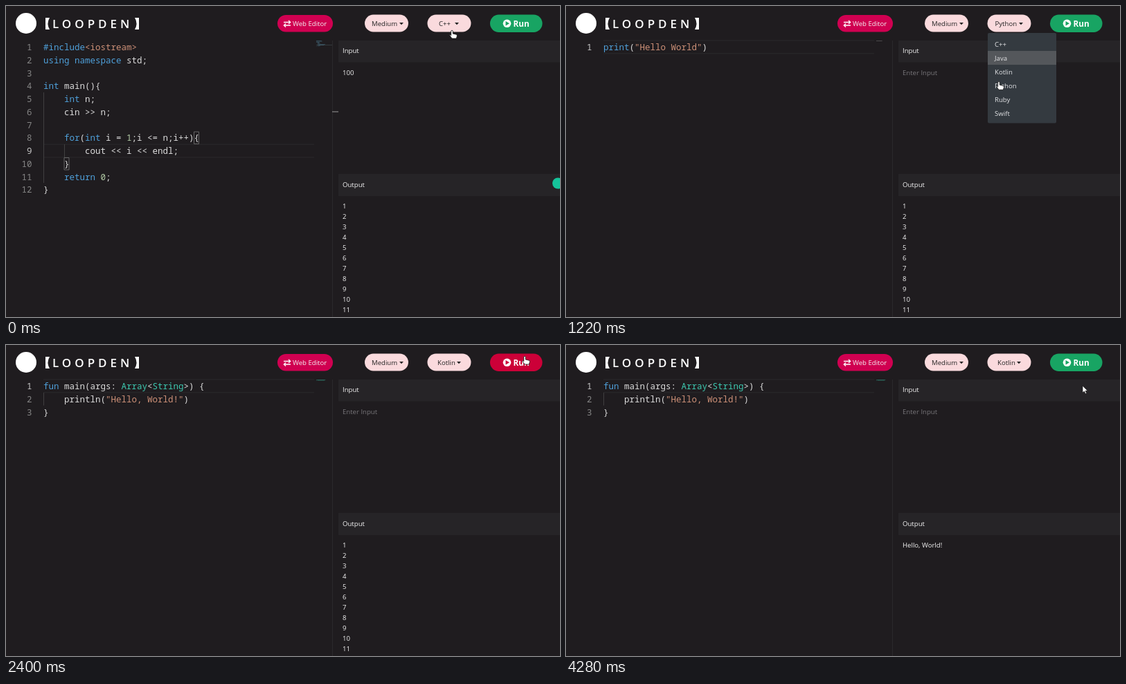
An HTML page that plays this animation: 800x450 px, repeating every 4.3 s.

```html
<!DOCTYPE html>
<html lang="en">
<head>
<meta charset="utf-8">
<title>Code editor</title>
<style>
html, body { margin: 0; width: 100%; height: 100%; overflow: hidden; background: #1f1c1f; }
svg { display: block; width: 800px; height: 450px; }
text { font: 9.6px "Open Sans", "Noto Sans", sans-serif; fill: #f4f4f4; white-space: pre; }
.code text { font: 12.5px "Noto Sans Mono", "DejaVu Sans Mono", monospace; fill: #dcdcdc; }
.code .num { text-anchor: end; fill: #858585; }
.code .now { fill: #c6c6c6; }
.pill { fill: #fadadd; }
.dark { fill: #222; }
.brand { font-size: 17px; font-weight: 600; letter-spacing: 5px; fill: #fff; }
.run { font-size: 11.7px; font-weight: 700; fill: #fff; }
.menu text { fill: #e2e3e5; }
.line { fill: none; stroke: #2b292c; }
.guide { stroke: #404040; }
.match { fill: none; stroke: #777; stroke-width: .8; }
</style>
</head>
<body>
<svg viewBox="0 0 800 450">
  <circle cx="29" cy="25" r="15" fill="#fff"/>
  <path d="M57 17h6q-5 8.5 0 17h-6zM192 17h-6q5 8.5 0 17h6z" fill="#fff"/>
  <text class="brand" x="67" y="32">LOOPDEN</text>

  <rect x="392" y="13" width="80" height="24.5" rx="12.2" fill="#d00051"/>
  <path d="M401 23.5h9M408 21l2.7 2.5-2.7 2.5M411 28h-9M404 25.500l-2.700 2.500 2.700 2.500" fill="none" stroke="#fff" stroke-width="1.3"/>
  <text x="414" y="29">Web Editor</text>
  <rect class="pill" x="518" y="12.500" width="63" height="25" rx="12.500"/>
  <text class="dark" x="528" y="29">Medium</text>
  <path class="dark" d="M568 24h6l-3 3.200z"/>
  <rect class="pill" x="608.500" y="12.500" width="63" height="25" rx="12.500"/>
  <text class="dark" id="lang" y="29"></text>
  <path class="dark" id="caret" d="M0 24h6l-3 3.200z"/>

  <rect id="runBox" x="699" y="12.500" width="75.500" height="25.500" rx="12.700"/>
  <g id="play"><circle r="5.800" fill="#fff"/><path id="triangle" d="M-2 -3.200L3.500 0L-2 3.200z"/></g>
  <text class="run" id="runText" x="732.500" y="29.800">Run</text>

  <rect x="480" y="50" width="320" height="31.500" fill="#262427"/>
  <text x="486" y="68">Input</text>
  <text id="input" x="486" y="99.600"></text>
  <rect x="480" y="243" width="320" height="32" fill="#262427"/>
  <text x="486" y="261.500">Output</text>
  <g id="counts"></g>
  <text id="hello" x="486" y="293">Hello, World!</text>

  <g id="editors"></g>
  <text id="loading" x="219" y="279.500" style="fill:#20282b">Loading...</text>
  <rect id="bar" x="471" y="50" width="9" height="400" fill="#454547"/>
  <circle id="badge" cx="797" cy="256.500" r="8" fill="#15c39a"/>

  <g id="menu" class="menu">
    <rect x="609" y="39" width="99" height="130.500" rx="2" fill="#343a40"/>
    <rect id="mark" x="609" width="99" height="20" fill="#54575b"/>
  </g>

  <g id="cursor">
    <path id="hand" d="M-1.300 1Q0-.800 1.300 1V5l5 1.200q1.300.400 1.100 2L6.400 12H0L-3.300 7.500q.300-1.500 2 0z" fill="#fff" stroke="#111" stroke-width=".8"/>
    <path id="arrow" d="M0 0v10l2.400-2.100 1.700 3.600 1.600-.800-1.700-3.400h3.200z" fill="#fff" stroke="#111" stroke-width=".6"/>
    <path id="beam" d="M-2.500-5.500h2l.5.500.5-.500h2M0-5V5M-2.500 5.500h2l.5-.500.5.500h2" fill="none" stroke="#000"/>
  </g>
</svg>
<script>
const $ = id => document.getElementById(id);
const show = (id, on) => $(id).style.display = on ? "" : "none";
const esc = s => s.replace(/&/g, "&amp;").replace(/</g, "&lt;");
const within = (v, a, b) => v >= a && v < b;
const clamp = v => Math.max(0, Math.min(1, v));

const LOOP = 4300, ROW = 18.77, CHAR = 7.5;
const TOKEN = /("[^"]*"|<iostream>|#include|\b(?:using|namespace|int|for|return|fun)\b|\bprint(?=\()|\b\d\b|\bArray\b|\bString\b)/;

function tint(token) {
  if (/^["<]/.test(token)) return "#ce9178";
  if (/^\d/.test(token)) return "#b5cea8";
  if (/^[AS]/.test(token)) return "#3dc9b0";
  return "#4fa0da";
}

const paint = line => line.split(TOKEN).map((s, i) =>
  i % 2 ? `<tspan fill="${tint(s)}" style="fill:${tint(s)}">${esc(s)}</tspan>` : esc(s)).join("");

function editor(id, source, current, mapTint, extra) {
  const top = 50 + (current - 1) * ROW;
  let out = `<path class="line" d="M54 ${top}H445M54 ${top + ROW}H445M471.500 50V450"/>${extra}`;
  source.split("\n").forEach((line, i) => {
    const y = 64 + i * ROW, indent = line.search(/\S|$/);
    out += `<text class="num${i + 1 === current ? " now" : ""}" x="37.500" y="${y}">${i + 1}</text>
      <text x="54" y="${y}">${paint(line)}</text>
      <rect x="${448 + indent * .45}" y="${50 + i * .75}" width="${(line.length - indent) * .43}" height=".6" fill="${mapTint}" opacity=".7"/>`;
  });
  return `<g id="${id}" class="code">${out}</g>`;
}

const cpp = `#include<iostream>
using namespace std;

int main(){
    int n;
    cin >> n;

    for(int i = 1;i <= n;i++){
        cout << i << endl;
    }
    return 0;
}`;
const kotlin = `fun main(args: Array<String>) {
    println("Hello, World!")
}`;

$("editors").innerHTML =
  editor("cpp", cpp, 9, "#4d7f96",
    `<path class="guide" d="M54.500 125V256M84.500 200V219"/>
     <path class="match" d="M271.500 182h7v17.500h-7zM84 219.500h7v17.500h-7z"/>
     <path d="M471 153h9" stroke="#9a9a9a"/><path d="M448 56.500h23" stroke="#333a3d"/>`) +
  editor("python", 'print("Hello World")', 1, "#8a8a8a", "") +
  editor("kotlin", kotlin, 1, "#35a58f", `<path class="guide" d="M54.500 69V87.500"/>`);

for (let n = 1; n <= 11; n++)
  $("counts").innerHTML += `<text x="486" y="${278 + n * 15}">${n}</text>`;
["C++", "Java", "Kotlin", "Python", "Ruby", "Swift"].forEach((name, i) =>
  $("menu").innerHTML += `<text x="619" y="${58.700 + i * 20}">${name}</text>`);

// Pointer path: time, x, y
const path = [
  [0, 644, 35], [80, 644, 35], [440, 640, 112], [520, 642, 112], [640, 648, 127],
  [760, 648, 127], [980, 632, 32], [1080, 632, 34], [1160, 628, 75], [1220, 625, 109],
  [1300, 626, 128], [1460, 630, 118], [1700, 634, 102], [1780, 634, 100], [1860, 640, 98],
  [2120, 745, 30], [2400, 749, 16], [2640, 749, 20], [2720, 735, 32], [3160, 476, 250],
  [3260, 409, 345], [3360, 409, 345], [3460, 475, 300], [3780, 690, 172], [4000, 735, 88],
  [4200, 746, 59], [LOOP, 746, 59]
];

function pointer(t) {
  const i = Math.max(1, path.findIndex(p => p[0] > t));
  const [t0, x0, y0] = path[i - 1], [t1, x1, y1] = path[i];
  const k = clamp((t - t0) / (t1 - t0));
  return [x0 + (x1 - x0) * k, y0 + (y1 - y0) * k];
}

const langs = { "C++": [625, 648], Python: [619.500, 654], Kotlin: [623, 651] };

function draw() {
  const t = performance.now() % LOOP;

  const lang = t < 500 ? "C++" : t < 1800 ? "Python" : "Kotlin";
  $("lang").textContent = lang;
  $("lang").setAttribute("x", langs[lang][0]);
  $("caret").setAttribute("transform", `translate(${langs[lang][1]})`);

  show("cpp", t < 540);
  show("python", within(t, 900, 1840));
  show("kotlin", t >= 2060);
  show("loading", within(t, 560, 900) || within(t, 1860, 2060));
  show("badge", t < 200);
  $("input").textContent = t < 500 ? "100" : "Enter Input";
  $("input").style.fill = t < 500 ? "" : "#78767a";

  const busy = within(t, 2520, 3760);
  show("counts", t < 2560);
  show("hello", t >= 3760);
  show("runText", !busy);
  const spin = busy ? (t - 2520) / 1480 * 360 : 0;
  $("play").setAttribute("transform", `translate(${busy ? 737 : 723.500} 25.300) rotate(${spin})`);

  const hot = clamp((t - 2080) / 80) - clamp((t - 2700) / 120);
  const mix = (a, b) => Math.round(a + (b - a) * hot);
  const runTint = `rgb(${mix(24, 204)},${mix(164, 0)},${mix(99, 56)})`;
  $("runBox").style.fill = $("triangle").style.fill = runTint;
  $("bar").style.opacity = clamp((t - 3120) / 80) - clamp((t - 3500) / 120);

  const open = within(t, 100, 500) || within(t, 1060, 1800);
  const row = Math.floor((pointer(t - 60)[1] - 45) / 20);
  show("menu", open);
  show("mark", within(row, 0, 6));
  $("mark").setAttribute("y", 45 + row * 20);

  const [x, y] = pointer(t);
  const onButton = within(y, 12, 39) && (within(x, 608, 672) || within(x, 699, 775));
  const kind = open || onButton ? "hand" : y < 82 || within(x, 471, 480) ? "arrow" : "beam";
  for (const id of ["hand", "arrow", "beam"]) show(id, id === kind);
  $("cursor").setAttribute("transform", `translate(${x} ${y})`);

  requestAnimationFrame(draw);
}
draw();
</script>
</body>
</html>
```
